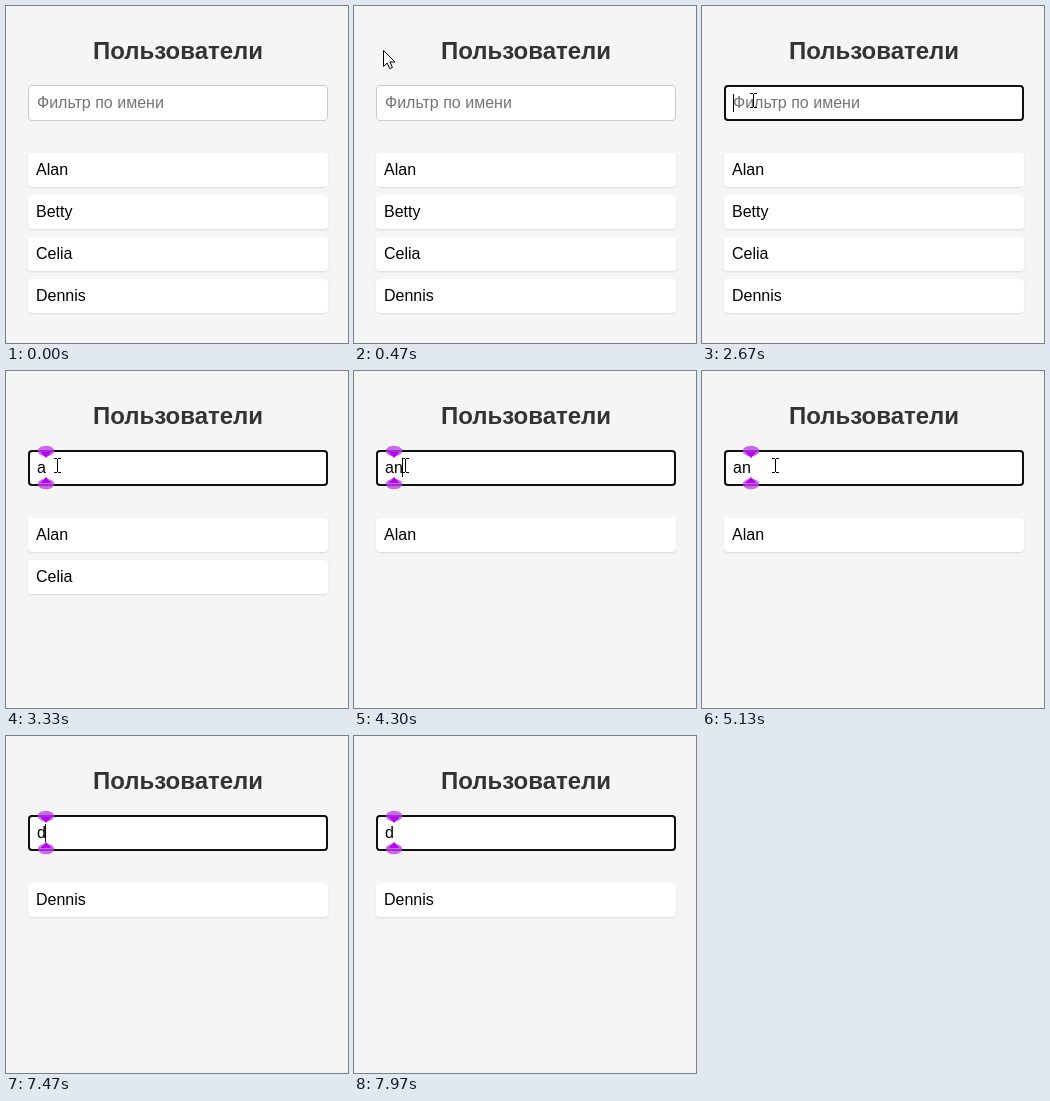
Write an HTML page that moves like this. It is 342 px wide and 337 px high and loops after 8 s.

```html
<!DOCTYPE html>
<html lang="ru">
<head>
<meta charset="utf-8">
<title>Пользователи</title>
<style>
  html, body { margin: 0; width: 100%; height: 100%; overflow: hidden; background: #f5f5f5; }
  body { position: relative; font: 16px/18px "Liberation Sans", Arial, sans-serif; color: #000; }
  h2 { position: absolute; left: 22px; top: 31px; width: 300px; margin: 0;
       font-size: 24px; line-height: 27px; text-align: center; color: #333; }
  .field, .row { position: absolute; left: 22px; width: 300px; box-sizing: border-box;
                 border-radius: 4px; background: #fff; white-space: pre; }
  .field { top: 79px; height: 36px; padding: 8px; border: 1px solid #ccc; }
  .field.focus { padding: 7px; border: 2px solid #101010; }
  .field.empty { color: #757575; }
  .field.selected span { background: #3367d1; color: #fff; }
  .field span { display: inline-block; height: 18px; }
  .row { height: 34px; padding: 8px; box-shadow: 0 1px 2px rgba(0, 0, 0, .1); }
  #caret { position: absolute; top: 88px; width: 1px; height: 18px; background: #000; }
  svg { position: absolute; left: 0; top: 0; }
</style>
</head>
<body>
<h2>Пользователи</h2>
<div id="field" class="field"><span id="value"></span></div>
<div id="list"></div>
<div id="caret"></div>
<svg width="342" height="337" viewBox="0 0 342 337">
  <g id="marker">
    <g id="half">
      <ellipse cy="-16.5" rx="8.3" ry="5.2" fill="#c13cf0" opacity=".78"/>
      <path d="M-5.5 -15.5H5.5L0 -9.5Z" fill="#b900f5"/>
    </g>
    <use href="#half" transform="scale(1 -1)"/>
  </g>
  <path id="arrow" d="M.5 .5V16.5L4.2 13L6.7 18.6L9.4 17.4L7 12H12Z"
        fill="#fff" stroke="#000" stroke-linejoin="round"/>
  <path id="beam" d="M-3 -6.5H0M1 -6.5H4M.5 -6V7M-3 7.5H0M1 7.5H4" fill="none" stroke="#000"/>
</svg>
<script>
const LOOP = 8000;
const $ = id => document.getElementById(id);
const field = $('field'), value = $('value'), list = $('list'), caret = $('caret');

const rows = ['Alan', 'Betty', 'Celia', 'Dennis'].map(name => {
  const el = document.createElement('div');
  el.className = 'row';
  el.textContent = name;
  list.append(el);
  return { el, key: name.toLowerCase() };
});

// [time, value]: each holds until the next
const QUERY = [[0, ''], [2800, 'a'], [4300, 'an'], [7470, 'd']];
const CARET = [[0, null], [1600, 31], [2170, null], [2670, 31], [2800, 39], [3330, null],
               [3900, 39], [4300, 48], [4830, null], [5330, 48], [5630, null],
               [7470, 39], [7970, null]];
const MARKER = [[0, null], [2830, 40], [4330, 49], [5630, null], [7470, 40]];
const FOCUS = 1600, DRAG = 5570, SELECTED = 5630, TYPED_OVER = 7470;

// [time, x, y]: pointer hot spot, linear in between
const POINTER = [[230, 178, 20], [300, 118, 25], [370, 66, 34], [430, 35, 41], [470, 28, 44],
                 [530, 30, 52], [630, 37, 72], [730, 45, 91], [830, 50, 99], [930, 52, 97],
                 [1000, 52, 95], [1070, 51, 94], [4770, 51, 94], [4900, 67, 94],
                 [5040, 67, 94], [5200, 82, 95], [5540, 82, 95], [5570, 77, 97],
                 [5600, 58, 108], [5630, 35, 131], [5667, 10, 160], [5700, -20, 185]];

const held = (steps, t) => steps.filter(s => s[0] <= t).pop()[1];

function pointerAt(t) {
  const i = POINTER.findIndex(p => p[0] > t);
  if (i < 1) return null;
  const [t0, x0, y0] = POINTER[i - 1], [t1, x1, y1] = POINTER[i];
  const k = (t - t0) / (t1 - t0);
  return [Math.round(x0 + (x1 - x0) * k), Math.round(y0 + (y1 - y0) * k)];
}

function place(el, pos) {
  el.style.display = pos ? '' : 'none';
  if (pos) el.setAttribute('transform', `translate(${pos})`);
}

function render(t) {
  const query = held(QUERY, t);
  value.textContent = query || 'Фильтр по имени';
  field.classList.toggle('empty', !query);
  field.classList.toggle('focus', t >= FOCUS);
  field.classList.toggle('selected', t >= SELECTED && t < TYPED_OVER);

  let shown = 0;
  for (const { el, key } of rows) {
    const match = key.includes(query);
    el.style.display = match ? '' : 'none';
    if (match) el.style.top = 147 + 42 * shown++ + 'px';
  }

  const caretX = held(CARET, t), markerX = held(MARKER, t);
  caret.style.display = caretX === null ? 'none' : '';
  caret.style.left = caretX + 'px';
  place($('marker'), markerX && [markerX, 96.5]);

  // The pointer moves on a 30 Hz grid
  const pos = pointerAt(Math.floor((t + 1) * 0.03) / 0.03);
  const overText = pos && (pos[1] >= 79 || t >= DRAG);
  place($('arrow'), overText ? null : pos);
  place($('beam'), overText ? pos : null);
}

const start = performance.now();
function tick() {
  render((performance.now() - start) % LOOP);
  requestAnimationFrame(tick);
}
render(0);
requestAnimationFrame(tick);
</script>
</body>
</html>
```
